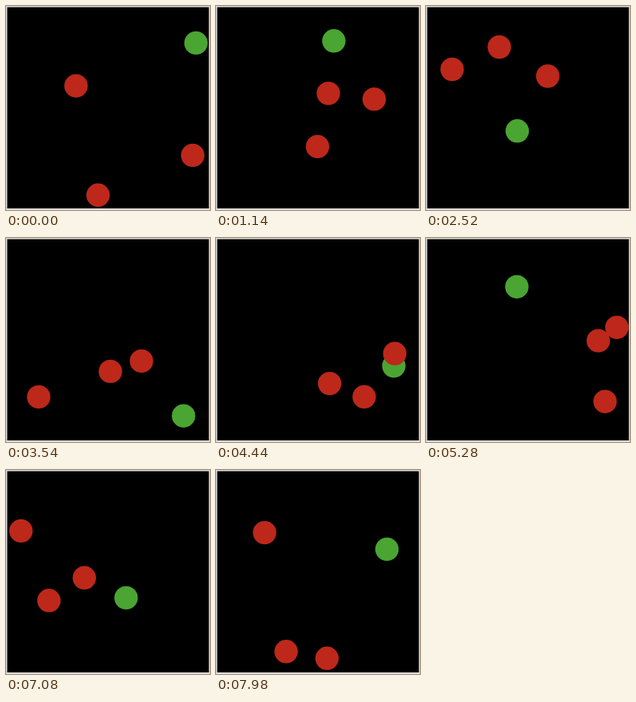
An HTML page with a canvas that plays this animation: 256 by 256 pixels, repeating every 8 s.

```html
<!DOCTYPE html>
<html>
<head>
<meta charset="utf-8">
<title>Chase</title>
<style>
  html, body { margin: 0; width: 100%; height: 100%; overflow: hidden; background: #dcdcdc; }
  canvas { display: block; width: 256px; height: 256px; }
</style>
</head>
<body>
<canvas id="stage" width="256" height="256"></canvas>
<script>
const ctx = document.getElementById('stage').getContext('2d');
const LOOP = 8000, STEP = 60, RADIUS = 14.7;
const GREEN = '#4aa532', RED = '#bd281b';
const ARENA = { left: 1.5, top: 1.5, right: 254.6, bottom: 254 };

// Each ball glides smoothly through a few waypoints and rebounds from the walls.
const RUNNER_TIMES = [0, 840, 1140, 1680, 2520, 3540, 4200, 5280, 5880, 6720, 7080, 7980];
const CHASER_TIMES = [0, 1140, 2520, 3540, 5280, 7080, 7980];
const balls = [
  { color: GREEN, times: RUNNER_TIMES,
    x: [238.4, 224, 147.9, 72, 114.5, 222.8, 238, 114, 39, 92, 150.7, 214.5],
    y: [46.4, 47, 43.8, 72, 156.8, 223.2, 185, 61.2, 38, 85, 160.4, 99.4] },
  { color: RED, times: CHASER_TIMES,
    x: [87.9, 141, 152.8, 131, 224.7, 53.9, 88],
    y: [100.2, 109.6, 88, 167.4, 205.2, 163.8, 227.8] },
  { color: RED, times: CHASER_TIMES,
    x: [115.5, 127.4, 92, 170, 240.3, 98.3, 139.3],
    y: [237.3, 176.4, 51.5, 154.4, 112.2, 135.3, 236.3] },
  { color: RED, times: CHASER_TIMES,
    x: [234.3, 198.5, 32.8, 41, 216.2, 18.8, 61],
    y: [187.4, 116.9, 79.5, 199.4, 128.9, 76.4, 78.6] }
];

function tangent(times, values, i) {
  const slope = k => (values[k + 1] - values[k]) / (times[k + 1] - times[k]);
  if (i === 0) return slope(0);
  if (i === times.length - 1) return slope(i - 1);
  const before = times[i] - times[i - 1], after = times[i + 1] - times[i];
  return (slope(i - 1) * after + slope(i) * before) / (before + after);
}

function glide(times, values, time) {
  let i = 0;
  while (i < times.length - 2 && time >= times[i + 1]) i++;
  const span = times[i + 1] - times[i];
  const u = (time - times[i]) / span, v = 1 - u;
  return v * v * (1 + 2 * u) * values[i] + u * u * (3 - 2 * u) * values[i + 1]
    + span * u * v * (v * tangent(times, values, i) - u * tangent(times, values, i + 1));
}

function rebound(value, low, high) {
  const min = low + RADIUS, max = high - RADIUS;
  if (value < min) return 2 * min - value;
  return value > max ? 2 * max - value : value;
}

function draw(now) {
  const time = Math.floor((now % LOOP) / STEP) * STEP;
  const { left, top, right, bottom } = ARENA;
  ctx.fillStyle = '#dcdcdc';
  ctx.fillRect(0, 0, 256, 256);
  ctx.fillStyle = '#000';
  ctx.fillRect(left, top, right - left, bottom - top);
  for (const { color, times, x, y } of balls) {
    ctx.fillStyle = color;
    ctx.beginPath();
    ctx.arc(rebound(glide(times, x, time), left, right),
            rebound(glide(times, y, time), top, bottom), RADIUS, 0, 2 * Math.PI);
    ctx.fill();
  }
}

const start = performance.now();
function tick() {
  draw(performance.now() - start);
  requestAnimationFrame(tick);
}
tick();
</script>
</body>
</html>
```
